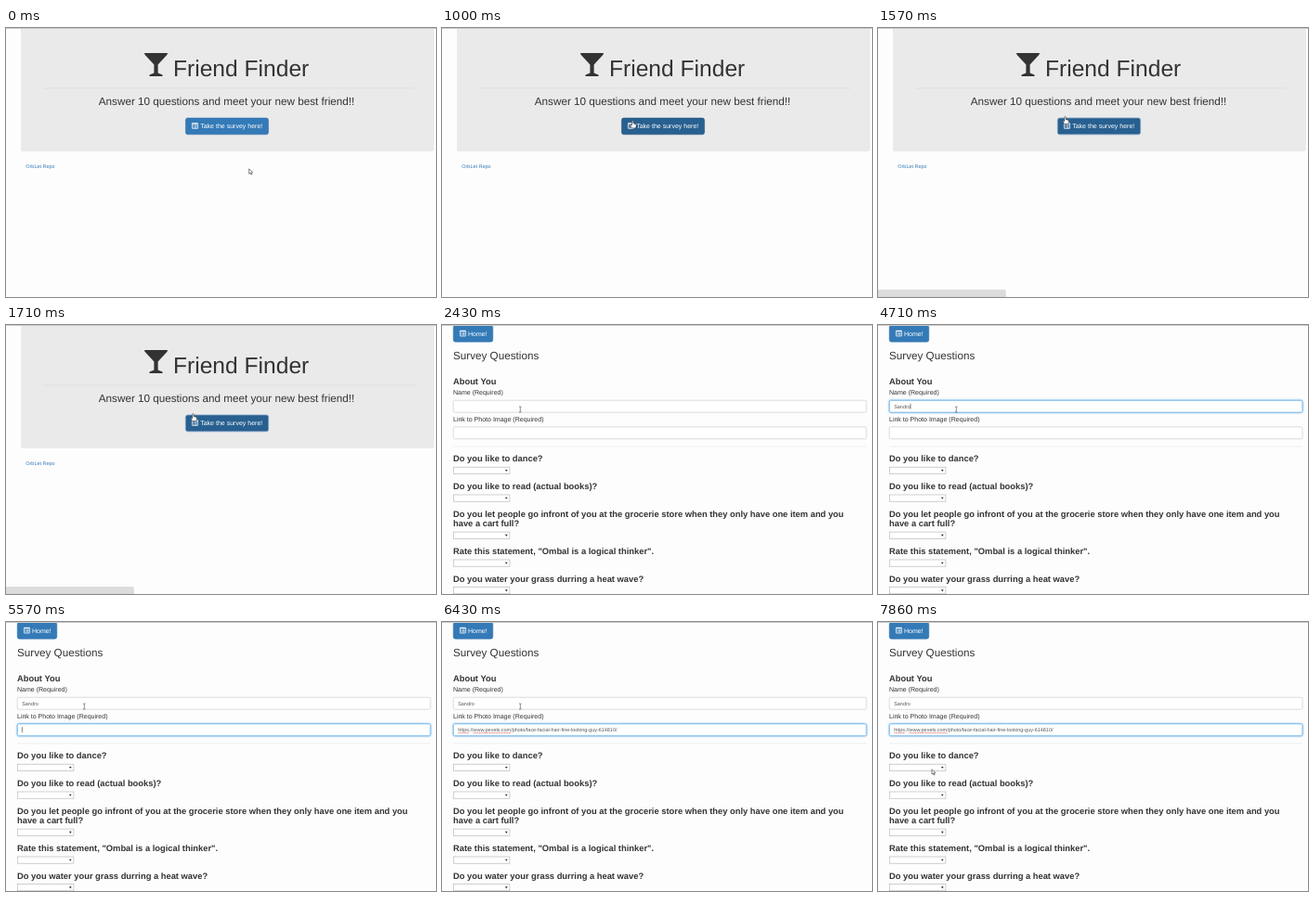
Animation of 463x290 px, one loop 8000 ms. Source, as an HTML page:

```html
<!DOCTYPE html>
<html lang="en">
<head>
<meta charset="utf-8">
<title>Friend survey</title>
<style>
  html, body { margin: 0; width: 100%; height: 100%; overflow: hidden; background: #fdfdfd; }
  svg { display: block; width: 463px; height: 290px; }
  text { font-family: "Liberation Sans", Arial, sans-serif; fill: #333; text-rendering: geometricPrecision; white-space: pre; }
  .h1 { font-size: 24.6px; }
  .h2 { font-size: 11.7px; }
  .h3 { font-size: 9.36px; font-weight: bold; }
  .lead { font-size: 7.02px; }
  .small { font-size: 5.46px; }
  .tiny { font-size: 4.65px; }
  .light { fill: #fff; }
  .typed { fill: #555; }
  .button { fill: #337ab7; stroke: #2e6da4; stroke-width: .5; }
  .button.hover { fill: #286090; stroke: #204d74; }
  .button.pressed { stroke: #7d9fc0; stroke-width: .8; }
  .field { fill: #fff; stroke: #ccc; stroke-width: .7; }
  .field.focus { stroke: #66afe9; stroke-width: .9; filter: drop-shadow(0 0 1.2px rgba(102, 175, 233, .7)); }
  .select { fill: #fff; stroke: #b0b0b0; stroke-width: .6; }
  .squiggle { stroke: #e05a5a; stroke-width: .8; stroke-dasharray: 1.1 .5; }
  .caret { stroke: #333; stroke-width: .6; }
  .pointer { fill: #fff; stroke: #333; stroke-width: .6; stroke-linejoin: round; }
</style>
</head>
<body>
<svg viewBox="0 0 463 290">
  <defs>
    <g id="list" fill="none" stroke="#fff">
      <rect x=".4" y=".4" width="6.2" height="5.8" rx=".5" stroke-width=".7"/>
      <path d="M.4 .8H6.6" stroke-width="1"/>
      <path d="M1.3 2.4h.7M2.6 2.4h3.1M1.3 3.8h.7M2.6 3.8h3.1M1.3 5.1h.7M2.6 5.1h3.1" stroke-width=".65"/>
    </g>
  </defs>
  <rect width="463" height="290" fill="#fdfdfd"/>

  <g id="home">
    <path d="M16 0H461V130.7a2.3 2.3 0 0 1-2.3 2.3H18.3a2.3 2.3 0 0 1-2.3-2.3Z" fill="#ebeaeb"/>
    <path d="M149.3 27H173.7Q174.3 27.8 173.5 28.7L163.6 39.5V48.6L168.5 50.4V52H154.5V50.4L159.4 48.6V39.5L149.5 28.7Q148.7 27.8 149.3 27Z" fill="#333"/>
    <text class="h1" x="180" y="51.7">Friend Finder</text>
    <path d="M40 65H440" stroke="#d9d9d9" stroke-width=".7"/>
    <text class="h2" x="99.8" y="82.7">Answer 10 questions and meet your new best friend!!</text>
    <rect id="start" class="button" x="193.4" y="97" width="89.2" height="17.8" rx="2.3"/>
    <use href="#list" x="200" y="102.2"/>
    <text class="lead light" x="209.2" y="108.4">Take the survey here!</text>
    <text class="small" x="21.3" y="151.3" style="fill:#337ab7">OrbLet Repo</text>
    <path id="status" d="M0 282.5H136a1.4 1.4 0 0 1 1.4 1.4V290H0Z" fill="#dcdcdc" stroke="#cfcfcf" stroke-width=".5"/>
  </g>

  <g id="survey">
    <rect class="button" x="12.2" y=".4" width="42.6" height="17.8" rx="2.3"/>
    <use href="#list" x="19" y="5.8"/>
    <text class="lead light" x="28" y="11.8">Home!</text>
    <text class="h2" x="12" y="37">Survey Questions</text>
    <text class="h3" x="12" y="64">About You</text>
    <text class="lead" x="12" y="75.4">Name (Required)</text>
    <rect id="nameField" class="field" x="12.2" y="81.2" width="444.8" height="13" rx="1.5"/>
    <text id="nameText" class="small typed" x="17.2" y="89.6"></text>
    <text class="lead" x="12" y="104.1">Link to Photo Image (Required)</text>
    <rect id="linkField" class="field" x="12.2" y="109.8" width="444.8" height="13" rx="1.5"/>
    <text id="linkText" class="small typed" x="17.2" y="118.2"></text>
    <path id="spelling" class="squiggle" d="M17.3 119.6H29M33.5 119.6H74.4"/>
    <path d="M12 131H457" stroke="#e9e9e9" stroke-width=".7"/>
    <g id="questions"></g>
    <g id="autofill">
      <rect x="11.8" y="94.8" width="446" height="19" fill="#fff" stroke="#c4c4c4" stroke-width=".6"/>
      <text class="tiny" x="15.6" y="101" style="font-weight:bold;fill:#111">Sandro</text>
      <text class="tiny" x="454.5" y="101" text-anchor="end" style="fill:#999">Sandro M Quilby</text>
      <path d="M12 104.2H457.6" stroke="#999" stroke-width=".8"/>
      <text class="tiny" x="15.6" y="110.8">Autofill settings</text>
    </g>
    <path id="caret" class="caret" d="M0 0V6"/>
  </g>

  <path d="M0 .5H463" stroke="#cbcbcb" stroke-width="1"/>
  <g id="pointer">
    <path id="arrow" class="pointer" d="M0 0V5.4L1.3 4.3L2.2 6.3L3.1 5.9L2.3 4H4Z"/>
    <path id="hand" class="pointer" d="M-.7 .4Q0 -.5 .7 .4V3L3.6 3.9Q4.3 4.3 4 5.6L3.4 8H-.8L-2.4 5.2Q-2.4 4.2 -.7 5Z"/>
    <path id="beam" d="M-1.3 -3H-.3L0 -2.6L.3 -3H1.3M0 -2.6V2.6M-1.3 3H-.3L0 2.6L.3 3H1.3" fill="none" stroke="#444" stroke-width=".6"/>
  </g>
</svg>
<script>
const FPS = 7, LOOP = 8000;
const NAME = "Sandro";
const LINK = "https://www.pexels.com/photo/face-facial-hair-fine-looking-guy-614810/";
const KEY_TIMES = [3570, 3860, 4000, 4140, 4430, 4570];
const PAGE_TIME = 1850, NAME_FOCUS = 2860, LINK_FOCUS = 5130, PASTE = 5850;

const $ = id => document.getElementById(id);
const show = (id, on) => $(id).style.display = on ? "" : "none";

const questions = [
  [147.2, "Do you like to dance?"],
  [177, "Do you like to read (actual books)?"],
  [206.9, "Do you let people go infront of you at the grocerie store when they only have one item and you", "have a cart full?"],
  [247, "Rate this statement, \"Ombal is a logical thinker\"."],
  [276.6, "Do you water your grass durring a heat wave?"]
];
$("questions").innerHTML = questions.map(([y, ...lines]) => {
  const last = y + (lines.length - 1) * 10.2;
  return lines.map((line, i) => `<text class="h3" x="12" y="${y + i * 10.2}">${line}</text>`).join("") +
    `<rect class="select" x="12.3" y="${last + 6}" width="60.6" height="7.2"/>` +
    `<path d="M67.9 ${last + 8.7}h2.8l-1.4 2.1z" fill="#333"/>`;
}).join("");

// Pointer stops: time, x, y
const stops = [
  [0, 261.7, 151.8], [140, 261.7, 151.8], [1140, 202, 97], [1290, 201.5, 95.5],
  [1850, 201.5, 95.5], [2290, 84.3, 91], [7000, 84.3, 91], [7860, 58, 158.7]
];
function pointerAt(t) {
  const next = stops.findIndex(s => s[0] > t);
  if (next < 0) return stops[stops.length - 1].slice(1);
  const [t0, x0, y0] = stops[next - 1], [t1, x1, y1] = stops[next];
  const u = (t - t0) / (t1 - t0), ease = u * u * (3 - 2 * u);
  return [x0 + (x1 - x0) * ease, y0 + (y1 - y0) * ease];
}

function placeCaret(t, field, y, since) {
  const width = $(field).textContent ? $(field).getComputedTextLength() : 0;
  $("caret").setAttribute("transform", `translate(${17.4 + width} ${y})`);
  show("caret", (t - since) % 1060 < 530);
}

function render(t) {
  const onSurvey = t >= PAGE_TIME;
  const [x, y] = pointerAt(t);
  const hover = !onSurvey && x < 283 && y > 94 && y < 115;
  const overField = onSurvey && x > 12 && (y > 81 && y < 95 || y > 109 && y < 123);
  show("home", !onSurvey);
  show("survey", onSurvey);
  $("pointer").setAttribute("transform", `translate(${x} ${y})`);
  show("hand", hover);
  show("beam", overField);
  show("arrow", !hover && !overField);
  $("start").classList.toggle("hover", hover);
  $("start").classList.toggle("pressed", t >= 1420);
  show("status", t >= 1280);
  if (!onSurvey) return;

  const typed = KEY_TIMES.filter(k => t >= k - 5).length;
  const onLink = t >= LINK_FOCUS, onName = t >= NAME_FOCUS && !onLink;
  const pasted = t >= PASTE;
  $("nameText").textContent = NAME.slice(0, typed);
  $("linkText").textContent = pasted ? LINK : "";
  $("nameField").classList.toggle("focus", onName);
  $("linkField").classList.toggle("focus", onLink);
  show("spelling", pasted);
  show("autofill", typed > 0 && typed < NAME.length);
  if (onLink) placeCaret(t, "linkText", 113.2, pasted ? PASTE - 60 : LINK_FOCUS);
  else if (onName) placeCaret(t, "nameText", 84.6, typed ? KEY_TIMES[typed - 1] - 5 : NAME_FOCUS);
  else show("caret", false);
}

const start = performance.now();
function tick() {
  const t = (performance.now() - start) % LOOP;
  render(Math.floor(t * FPS / 1000 + .04) * 1000 / FPS);
  requestAnimationFrame(tick);
}
tick();
</script>
</body>
</html>
```
